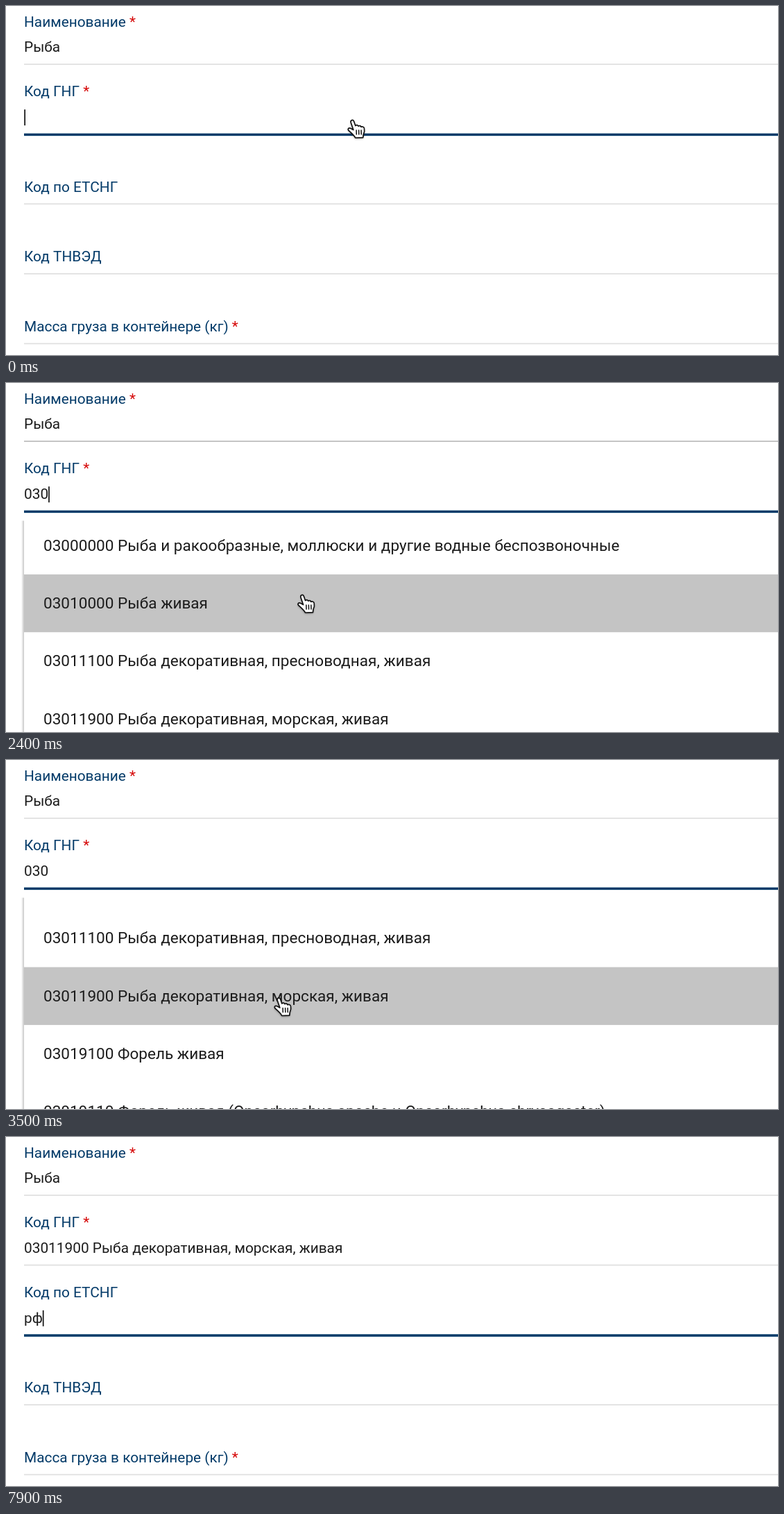
An HTML page with a canvas that plays this animation: 1113x503 px, repeating every 8000 ms.

```html
<!DOCTYPE html>
<html lang="ru">
<head>
<meta charset="utf-8">
<style>
html, body { margin: 0; width: 100%; height: 100%; overflow: hidden; background: #fff; }
canvas { display: block; width: 1113px; height: 503px; }
</style>
</head>
<body>
<canvas id="stage"></canvas>
<script>
const W = 1113, H = 503, LOOP = 8000, STEP = 100;
const LEFT = 26, ROW = 100.65, ITEM = 83.35, PANEL_TOP = 192.5;
const NAVY = '#043b69', RED = '#d60a0a', INK = '#1c1c1c';
const FIELD_FONT = '20.83px Roboto, sans-serif';
const ITEM_FONT = '22.57px Roboto, sans-serif';

const ITEMS = [
  '03000000 Рыба и ракообразные, моллюски и другие водные беспозвоночные',
  '03010000 Рыба живая',
  '03011100 Рыба декоративная, пресноводная, живая',
  '03011900 Рыба декоративная, морская, живая',
  '03019100 Форель живая',
  '03019110 Форель живая (Oncorhynchus apache и Oncorhynchus chrysogaster)',
  '03019190 Форель живая прочая'
];

// Tracks: [time, value] pairs; "held" keeps the last value, "tween" blends.
const CODE = [[0, ''], [600, '0'], [900, '03'], [1200, '030'], [3700, ITEMS[3]]];
const ETSNG = [[0, ''], [6000, '0'], [6300, '03'], [6500, '030'], [6900, '03'],
  [7000, '0'], [7200, ''], [7800, 'р'], [7900, 'рф']];
const CARET = [[0, 1], [200, 0], [600, 1], [1800, 0], [2200, 1], [2700, 0],
  [4900, 1], [5400, 0], [5900, 1], [7700, 0], [7800, 1]];
const HOVER = [[0, -1], [2000, 0], [2400, 1], [3200, 3], [3700, -1]];
const SCROLL = [[2800, 0], [2900, 67.5], [3000, 105], [3100, 128], [3300, 144]];
const HAND_X = [[1800, 491.5], [2200, 421.5], [2600, 417], [3100, 417], [3500, 385.5],
  [3700, 385.5], [4300, 326.5]];
const HAND_Y = [[1800, 163], [2200, 252], [2600, 356], [3100, 356], [3500, 341.5],
  [3700, 341.5], [4300, 261]];
const HAND = new Path2D('M9.3 15.6 L5.7 5 C4.8 1.4 8.8 .2 10.1 3.3 L12.3 9.5' +
  ' C13.2 8.1 15.9 8.3 16.5 10.2 C17.6 8.9 20 9.5 20.5 11.4' +
  ' C22.2 10.3 24.6 11.2 25 13.4 C25.7 16.8 25.5 18.8 23.8 21.8 L23.2 26.6 L12.2 27' +
  ' C10.6 23.6 6.2 19.8 3 17 C.4 14.7 2.4 11.9 5.2 13.2 Z');

const canvas = document.getElementById('stage');
const dpr = window.devicePixelRatio || 1;
canvas.width = W * dpr;
canvas.height = H * dpr;
const ctx = canvas.getContext('2d');

const clamp = v => Math.min(1, Math.max(0, v));
const easeOut = v => 1 - (1 - clamp(v)) ** 3;

function held(track, t) {
  let value = track[0][1];
  for (const [at, v] of track) if (t >= at) value = v;
  return value;
}

function tween(track, t) {
  let [t0, v0] = track[0];
  for (const [t1, v1] of track) {
    if (t < t1) return t <= t0 ? v0 : v0 + (v1 - v0) * (t - t0) / (t1 - t0);
    t0 = t1;
    v0 = v1;
  }
  return v0;
}

function text(str, x, y, color, font = FIELD_FONT) {
  ctx.font = font;
  ctx.fillStyle = color;
  ctx.fillText(str, x, y);
  return x + ctx.measureText(str).width;
}

function rect(x, y, w, h, color) {
  ctx.fillStyle = color;
  ctx.fillRect(x, y, w, h);
}

function field(index, { label, required, value = '', lift = 1, focus = 0, caret, line = '#e0e0e0' }) {
  const base = 84 + index * ROW;
  const end = text(label, LEFT, base - 17.5 - 36.7 * lift, NAVY);
  if (required) text(' *', end, base - 17.5 - 36.7 * lift, RED);
  const tail = text(value, LEFT, base - 17.6, INK);
  rect(LEFT, base - 0.9, W - LEFT, 1.75, line);
  if (focus > 0) {
    const full = 1300, w = full * (0.5 + 0.5 * focus);
    ctx.globalAlpha = clamp(focus * 2);
    rect(LEFT + (full - w) / 2, base - 1, w, 3.5, NAVY);
    ctx.globalAlpha = 1;
  }
  if (caret) rect(tail + (value ? 0 : 0.3), base - 35.5, 1.7, 23, '#111');
}

function panel(t) {
  if (t < 1800 || t >= 3800) return;
  const open = t >= 3700 ? 0.4 : clamp((t - 1700) / 200);
  const scale = t >= 3700 ? 1 : 0.8 + 0.2 * open;
  const scroll = tween(SCROLL, t), hover = held(HOVER, t);
  ctx.save();
  ctx.globalAlpha = open;
  ctx.translate(0, PANEL_TOP);
  ctx.scale(1, scale);
  const shade = ctx.createLinearGradient(LEFT - 4, 0, LEFT, 0);
  shade.addColorStop(0, 'rgba(0,0,0,0)');
  shade.addColorStop(1, 'rgba(0,0,0,.22)');
  rect(LEFT - 4, 6, 4, 420, shade);
  rect(LEFT, 0, W - LEFT, 420, '#fff');
  ctx.beginPath();
  ctx.rect(LEFT, 0, W - LEFT, 420);
  ctx.clip();
  ITEMS.forEach((item, i) => {
    const y = i * ITEM - scroll;
    if (i === hover) rect(LEFT, y, W - LEFT, ITEM, i ? '#c4c4c4' : '#cccccc');
    text(item, 54, y + 49, INK, ITEM_FONT);
  });
  ctx.restore();
}

function hand(t) {
  if ((t >= 600 && t < 1800) || t >= 6000) return;
  ctx.save();
  ctx.translate(tween(HAND_X, t), tween(HAND_Y, t));
  ctx.lineJoin = ctx.lineCap = 'round';
  ctx.shadowColor = 'rgba(0,0,0,.4)';
  ctx.shadowBlur = 3 * dpr;
  ctx.shadowOffsetY = 1.5 * dpr;
  ctx.fillStyle = '#fff';
  ctx.fill(HAND);
  ctx.shadowColor = 'transparent';
  ctx.strokeStyle = '#111';
  ctx.lineWidth = 1.7;
  ctx.stroke(HAND);
  ctx.lineWidth = 1.5;
  ctx.beginPath();
  for (const x of [13.6, 17.1, 20.6]) {
    ctx.moveTo(x, 16);
    ctx.lineTo(x + 0.2, 22);
  }
  ctx.stroke();
  ctx.restore();
}

function draw(t) {
  ctx.setTransform(dpr, 0, 0, dpr, 0, 0);
  rect(0, 0, W, H, '#fff');
  const caret = held(CARET, t);
  const first = t < 3800, second = t >= 4900;
  const enter = easeOut((t - 4800) / 400);
  field(0, { label: 'Наименование', required: true, value: 'Рыба',
    line: t >= 1900 && t < 2600 ? '#bdbdbd' : '#e0e0e0' });
  field(1, { label: 'Код ГНГ', required: true, value: held(CODE, t),
    focus: first ? 1 : 0, caret: first && caret });
  field(2, { label: 'Код по ЕТСНГ', value: held(ETSNG, t), lift: enter,
    focus: enter, caret: second && caret });
  field(3, { label: 'Код ТНВЭД', lift: 0 });
  field(4, { label: 'Масса груза в контейнере (кг)', required: true, lift: 0 });
  panel(t);
  hand(t);
}

const start = performance.now();
function tick() {
  const t = (performance.now() - start) % LOOP;
  draw(Math.floor(t / STEP) * STEP);
  requestAnimationFrame(tick);
}
tick();
</script>
</body>
</html>
```
